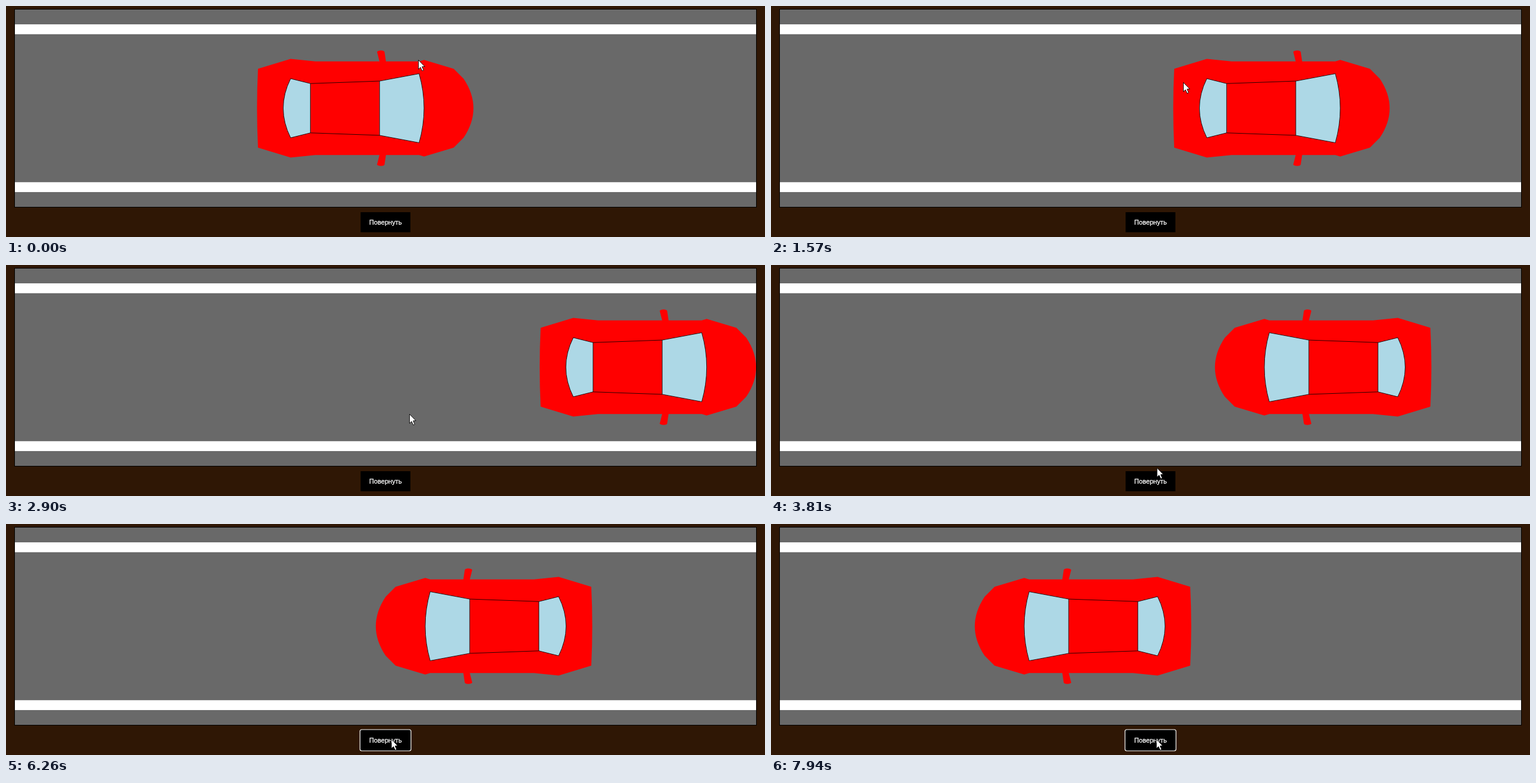
These frames come from a looping animation (1280 by 391 pixels, 8000 ms). An HTML page with a canvas:

```html
<!DOCTYPE html>
<html lang="ru">
<head>
<meta charset="utf-8">
<title>Машина на дороге</title>
<style>
html, body { margin: 0; width: 100%; height: 100%; overflow: hidden; background: #2f1705; }
canvas { display: block; }
</style>
</head>
<body>
<canvas id="stage" width="1280" height="391"></canvas>
<script>
const ctx = document.getElementById('stage').getContext('2d');
const LOOP = 8000, STEP = 70, LEAD = 30;
const ROAD = { x: 15, y: 6, w: 1250, h: 334, unitsW: 1500, unitsH: 400 };

// The car drives at a constant speed, in road units per ms
const CAR_LEN = 438, CAR_START = 490, SPEED = 0.2, DEPART = 40;
// The wall on the right, then two clicks on the button
const TURNS = [2901, 4270, 5120];
const FOCUS_AT = 4200;

// [time, x, y] of the pointer tip
const POINTER = [
  [0, 695, 91], [1570, 695, 129], [2900, 680, 252], [3810, 650.5, 343], [4160, 649.5, 364]
];

function carAt(t) {
  let x = CAR_START, dir = 1, from = DEPART;
  for (const turn of TURNS) {
    if (t < turn) break;
    x += dir * SPEED * (turn - from);
    dir = -dir;
    from = turn;
  }
  return { x: x + dir * SPEED * Math.max(0, t - from), dir };
}

function pointerAt(t) {
  const i = POINTER.findIndex(p => p[0] > t);
  if (i < 0) return POINTER[POINTER.length - 1].slice(1);
  const [t0, x0, y0] = POINTER[i - 1], [t1, x1, y1] = POINTER[i];
  const k = (t - t0) / (t1 - t0);
  return [x0 + (x1 - x0) * k, y0 + (y1 - y0) * k];
}

// Each point is [x, y] for a line or [cx, cy, x, y] for a curve
function trace(points) {
  ctx.beginPath();
  points.forEach((p, i) => {
    if (i === 0) ctx.moveTo(...p);
    else if (p.length === 4) ctx.quadraticCurveTo(...p);
    else ctx.lineTo(...p);
  });
}

function fillShape(points, color) {
  trace(points);
  ctx.fillStyle = color;
  ctx.fill();
}

function pane(points) {
  fillShape(points, '#add8e6');
  ctx.stroke();
}

// One side of the car, from its long axis outwards
function drawHalfCar() {
  fillShape([[248, 94], [243, 114], [244, 116.5, 251, 117], [257, 117, 258, 114], [261, 94]], '#f00');
  fillShape([[0, 0], [0, 40, 2, 80], [68, 100], [118, 95], [328, 95], [338, 98],
    [398, 80], [418, 60], [438, 30, 438, 0]], '#f00');
  pane([[53, 0], [53, 30, 68, 60], [108, 50], [108, 0]]);
  pane([[248, 0], [248, 55], [328, 70], [338, 35, 338, 0]]);
  trace([[108, 50], [248, 55]]);
  ctx.stroke();
}

function drawCar({ x, dir }) {
  ctx.strokeStyle = '#000';
  ctx.lineWidth = 1;
  for (const side of [-1, 1]) {
    ctx.save();
    ctx.translate(dir > 0 ? x : x + CAR_LEN, ROAD.unitsH / 2);
    ctx.scale(dir, side);
    drawHalfCar();
    ctx.restore();
  }
}

function drawRoad(t) {
  const { x, y, w, h, unitsW, unitsH } = ROAD;
  ctx.fillStyle = '#000';
  ctx.fillRect(x - 1, y - 1, w + 2, h + 2);
  ctx.save();
  ctx.beginPath();
  ctx.rect(x, y, w, h);
  ctx.clip();
  ctx.translate(x, y);
  ctx.scale(w / unitsW, h / unitsH);
  ctx.fillStyle = '#696969';
  ctx.fillRect(0, 0, unitsW, unitsH);
  ctx.fillStyle = '#fff';
  for (const top of [30, 350]) ctx.fillRect(0, top, unitsW, 20);
  drawCar(carAt(t));
  ctx.restore();
}

function drawButton(focused) {
  ctx.fillStyle = '#000';
  if (focused) {
    ctx.beginPath();
    ctx.roundRect(597, 348, 86, 36, 3);
    ctx.fill();
    ctx.strokeStyle = '#fff';
    ctx.lineWidth = 1.2;
    ctx.stroke();
  } else {
    ctx.fillRect(598, 349, 84, 34);
  }
  ctx.font = '11.11px "Liberation Sans", Arial, sans-serif';
  ctx.textAlign = 'center';
  ctx.fillStyle = ctx.strokeStyle = '#fff';
  ctx.lineWidth = 0.3;
  ctx.fillText('Повернуть', 640, 370);
  ctx.strokeText('Повернуть', 640, 370);
}

function drawPointer(x, y) {
  ctx.save();
  ctx.translate(x + 0.5, y + 0.5);
  fillShape([[0, 0], [0, 15.5], [3.5, 12.3], [6.3, 18.3], [8.8, 17.2], [6.2, 11.3], [10.7, 11], [0, 0]], '#fff');
  ctx.strokeStyle = '#000';
  ctx.lineWidth = 0.9;
  ctx.stroke();
  ctx.restore();
}

function draw(time) {
  // The picture advances in even steps after a slightly longer first one
  const n = Math.max(0, Math.floor((time - LEAD) / STEP));
  const t = n && LEAD + n * STEP;
  ctx.fillStyle = '#2f1705';
  ctx.fillRect(0, 0, 1280, 391);
  drawRoad(t);
  drawButton(t >= FOCUS_AT);
  drawPointer(...pointerAt(t));
}

const start = performance.now();
function tick() {
  draw((performance.now() - start) % LOOP);
  requestAnimationFrame(tick);
}
tick();
</script>
</body>
</html>
```
